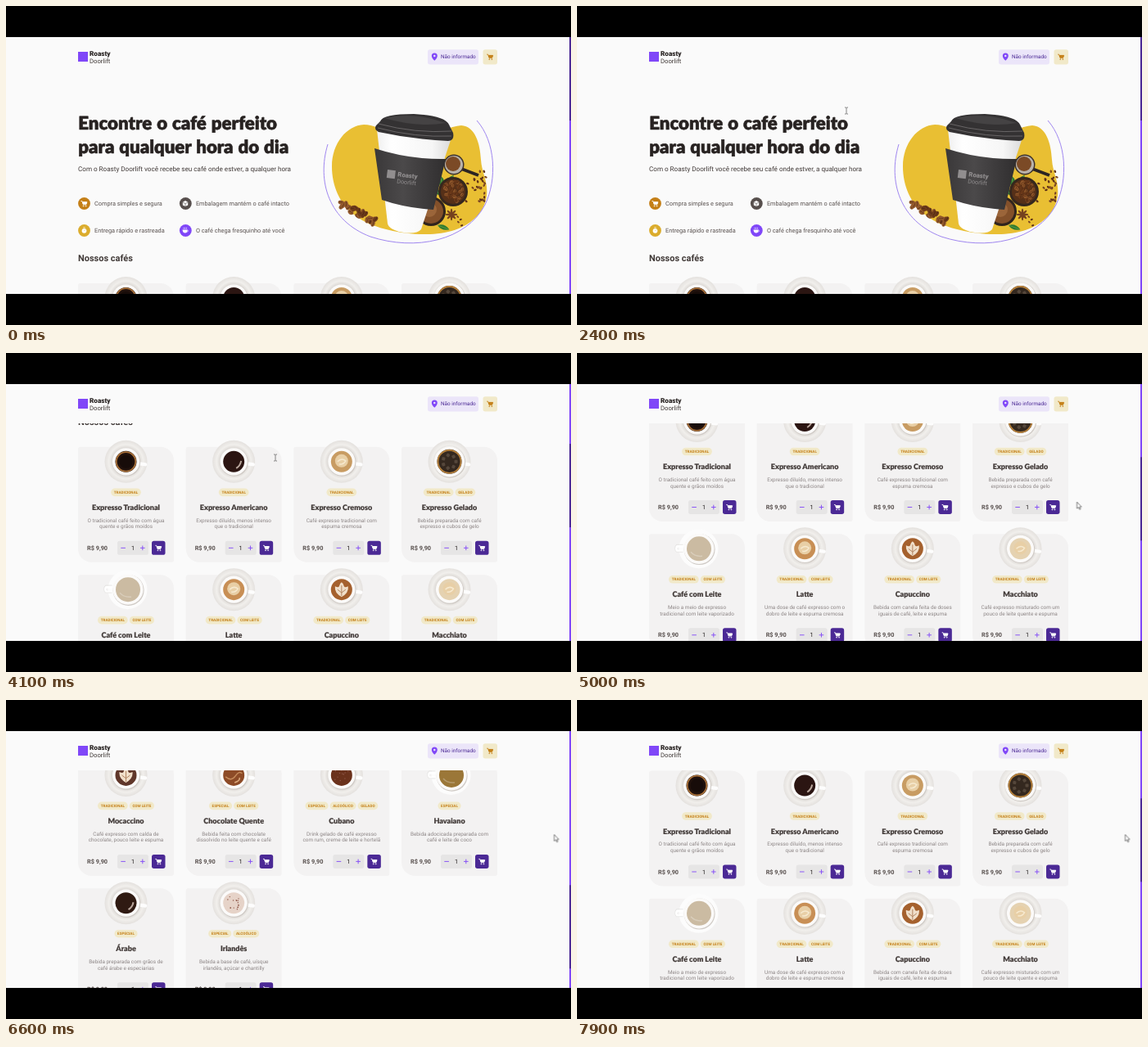
These frames come from a looping animation (690 by 390 pixels, 8 s). An HTML page:

```html
<!DOCTYPE html>
<html lang="pt-BR">
<head>
<meta charset="utf-8">
<title>Roasty Doorlift</title>
<style>
@property --scroll { syntax: "<number>"; inherits: true; initial-value: 0; }
html, body { margin: 0; width: 100%; height: 100%; overflow: hidden; background: #000; }
svg { display: block; width: 690px; height: 390px; font-family: Roboto, sans-serif; text-rendering: geometricPrecision; animation: scroll 8s linear infinite; }
.display { font-family: Lato, sans-serif; font-weight: 900; stroke-linejoin: round; }
.title { fill: #272221; stroke: #272221; stroke-width: .6px; word-spacing: .8px; }
.name { fill: #403937; stroke: #403937; stroke-width: .15px; }
#page { transform: translateY(calc(var(--scroll) * -1px)); }
#thumb { transform: translateY(calc(var(--scroll) * .326px)); }
#cursor { animation: move 8s linear infinite; }
#arrow { animation: arrow 8s step-end infinite; }
#beam { animation: beam 8s step-end infinite; }
@keyframes scroll {
  0%, 32.5% { --scroll: 0; }
  40% { --scroll: 72; }
  51.25% { --scroll: 224; }
  55%, 65% { --scroll: 274; }
  71.25% { --scroll: 364; }
  76.25%, 78.75% { --scroll: 647; }
  82.5% { --scroll: 578; }
  87.5%, 88.75% { --scroll: 450; }
  98.75%, 100% { --scroll: 252.5; }
}
@keyframes move {
  0%, 12.5% { transform: translate(420px, 352px); }
  22.5% { transform: translate(329px, 184px); }
  25%, 26.25% { transform: translate(329px, 134px); }
  30%, 55% { transform: translate(329px, 128px); }
  58.75%, 60% { transform: translate(551px, 200px); }
  65%, 100% { transform: translate(669.5px, 164.5px); }
}
@keyframes arrow {
  0% { opacity: 0; }
  12.5% { opacity: 1; }
  22.5% { opacity: 0; }
  56.25%, 100% { opacity: 1; }
}
@keyframes beam {
  0% { opacity: 0; }
  22.5% { opacity: 1; }
  56.25%, 100% { opacity: 0; }
}
</style>
</head>
<body>
<svg viewBox="0 0 690 390">
  <defs>
    <clipPath id="view"><rect y="86" width="690" height="266"/></clipPath>
    <radialGradient id="saucer">
      <stop offset=".6" stop-color="#d8d4d0"/><stop offset=".8" stop-color="#f1efec"/><stop offset="1" stop-color="#e4e1de"/>
    </radialGradient>
    <linearGradient id="paper">
      <stop offset="0" stop-color="#f0f0f0"/><stop offset=".2" stop-color="#fff"/><stop offset=".75" stop-color="#f6f6f6"/><stop offset="1" stop-color="#dcdcdc"/>
    </linearGradient>
    <linearGradient id="dark">
      <stop offset="0" stop-color="#3a3839"/><stop offset=".4" stop-color="#4b494a"/><stop offset="1" stop-color="#302e2f"/>
    </linearGradient>
    <g id="cart" fill="none" stroke="currentColor" stroke-width=".9">
      <path d="M-3.8-3h1.4l1.4 4.2h3.6l1-3h-5.4"/>
      <path d="M-1.7-1.5h4.9l-.7 2h-3.6z" fill="currentColor"/>
      <circle cx="-.7" cy="2.9" r=".5"/><circle cx="2.3" cy="2.9" r=".5"/>
    </g>
  </defs>
  <rect y="38" width="690" height="314" fill="#fafafa"/>
  <g clip-path="url(#view)"><g id="page"></g></g>
  <g id="header"></g>
  <rect x="688" y="38" width="2" height="314" fill="#8047f8"/>
  <rect id="thumb" x="688" y="38" width="2" height="102" fill="#4b2995"/>
  <g id="cursor">
    <path id="arrow" d="M0 0v8l1.9-1.6 1.3 2.8 1.2-.5-1.2-2.7h2.4z" fill="#fff" stroke="#444" stroke-width=".7"/>
    <path id="beam" d="M-2-4h1.5l.5.5.5-.5h1.5M0-3.5v7M-2 4h1.5l.5-.5.5.5h1.5" fill="none" stroke="#666" stroke-width=".8"/>
  </g>
  <rect y="352" width="690" height="38"/>
</svg>
<script>
const $ = id => document.getElementById(id);
const pen = document.createElement("canvas").getContext("2d");

let seed = 7;
const random = () => (seed = seed * 16807 % 2147483647) / 2147483647;

const text = (x, y, size, str, attrs = "") =>
  `<text x="${x}" y="${y + size * .35}" font-size="${size}" ${attrs}>${str}</text>`;
const rect = (x, y, w, h, fill, r = 0) =>
  `<rect x="${x}" y="${y}" width="${w}" height="${h}" rx="${r}" fill="${fill}"/>`;
const circle = (x, y, r, fill) => `<circle cx="${x}" cy="${y}" r="${r}" fill="${fill}"/>`;
const path = (d, fill, attrs = "") => `<path d="${d}" fill="${fill}" ${attrs}/>`;
const line = (d, color, width = .9) => path(d, "none", `stroke="${color}" stroke-width="${width}"`);
const at = (x, y, body, more = "") => `<g transform="translate(${x} ${y}) ${more}">${body}</g>`;
const cart = (x, y, color) => at(x, y, `<use href="#cart" color="${color}"/>`);
const times = (n, fn) => Array.from({ length: n }, (_, i) => fn(i)).join("");

const bean = (x, y, size) => at(x, y,
  `<ellipse rx="${size}" ry="${size * .68}" fill="${random() < .5 ? "#6d3b1b" : "#93592c"}"/>` +
  line(`M${-size * .8} 0q${size * .8}-1 ${size * 1.6} 0`, "#3a1c0d", .5),
  `rotate(${random() * 180})`);

// Beans scattered evenly over a disc
const pile = (n, x, y, r, size) => times(n, () => {
  const a = random() * 6.283, d = r * Math.sqrt(random());
  return bean(x + d * Math.cos(a), y + d * Math.sin(a), size);
});

function hero() {
  const blob = path("M398 196C398 168 416 146 437 145C464 145 472 172 497 165C520 160 540 147 556 146C573 147 579 168 580 188C581 204 589 214 587 232C583 262 552 278 518 279C488 280 452 273 432 260C409 246 398 222 398 196Z", "#e9bf33");
  const arc = line("M393 169C379 215 395 263 445 282C500 300 562 287 585 243C600 212 598 166 575 140", "#9f86f0", 1);
  const leaf = (x, y, size, turn) => at(x, y,
    path("M0 0Q-6-8 0-17Q6-8 0 0Z", "#2e7a30") + line("M0 0V-15", "#79ab4b", .6), `rotate(${turn}) scale(${size})`);
  const leaves = leaf(535, 226, 1.2, -15) + leaf(533, 231, 1, -60) + leaf(538, 219, .9, 35) + leaf(527, 268, .9, 110);
  const scoop = line("M556 199L577 207", "#2c2523", 4) + circle(547, 194, 12.5, "#3a302c") +
    circle(547, 194, 11, "#b9b2aa") + circle(546, 193, 9, "#7b4a26");
  const loose = times(26, i => bean(562 + random() * 24, 200 + random() * 42, 1.8)) + pile(5, 552, 264, 9, 1.6);
  const bowl = circle(546, 227, 18, "#35271e") + circle(546, 227, 15, "#563018") + pile(42, 546, 227, 13, 2.5);
  const ground = circle(519, 251, 18, "#30241d") + circle(519, 251, 15, "#83502a") + circle(517, 249, 9, "#9b653a");
  const anise = at(544, 255, times(8, i => `<ellipse cy="-3.6" rx="1.2" ry="3.6" fill="#76421f" transform="rotate(${i * 45})"/>`));
  const cup =
    path("M453 151L543 164L507 273Q502 279 486 277Q468 274 466 266Z", "url(#paper)") +
    path("M450 174Q493 188 537 187L522 249Q488 247 459 237Z", "url(#dark)") +
    path("M457 141Q460 132 498 132Q536 134 541 145L546 155Q548 165 540 165Q496 163 455 154Q449 151 452 146Z", "#343233") +
    line("M455 144Q500 156 544 153M454 149Q500 161 544 159", "#686566", 1) +
    path("M462 137Q500 129 537 143Q503 149 462 137Z", "#454344");
  const mark = at(466, 200, rect(0, 0, 10, 10, "#918e8f") +
    text(13, 4, 7.8, "Roasty", 'font-weight="800" fill="#918e8f"') +
    text(13, 12.5, 7.2, "Doorlift", 'fill="#918e8f"'), "rotate(7)");
  const left = times(30, i => bean(406 + (i % 15) * 3 + random() * 4, 238 + (i % 15) * 1.5 + random() * 9, 3.7));
  return blob + arc + scoop + loose + leaves + bowl + ground + anise + cup + mark + left;
}

function intro() {
  const feature = (x, y, color, icon, label) =>
    circle(x, y, 7.4, color) + icon + text(x + 12.6, y, 7.32, label, 'fill="#574f4d"');
  const box = path("M219 238l3.2 1.7v3.7l-3.2 1.7-3.2-1.7v-3.7z", "#fff") + line("M216 240l3 1.6 3-1.6M219 241.6v3.4", "#574f4d", .6);
  const timer = circle(95.5, 274.8, 2.9, "#fff") + rect(94.3, 270.5, 2.4, .8, "#fff") + line("M95.5 274.8l1.3-1.3", "#dbac2c", .6);
  const mug = path("M215.5 273.5h6.3q-.2 4-3.1 4t-3.2-4z", "#fff") + line("M221.8 274.3q2 .4-.6 2M217 272.5v-1.7M218.7 272.5v-1.7M220.4 272.5v-1.7", "#fff", .7);
  const title = 'class="display title"';
  return text(88.3, 143.3, 22.2, "Encontre o café perfeito", title) +
    text(88.3, 171.8, 22.2, "para qualquer hora do dia", title) +
    text(88, 198.7, 8.1, "Com o Roasty Doorlift você recebe seu café onde estver, a qualquer hora", 'fill="#403937"') +
    feature(95.5, 241.5, "#c47f17", cart(95.3, 241.5, "#fff"), "Compra simples e segura") +
    feature(219.3, 241.5, "#574f4d", box, "Embalagem mantém o café intacto") +
    feature(95.5, 274.5, "#dbac2c", timer, "Entrega rápido e rastreada") +
    feature(219.3, 274.5, "#8047f8", mug, "O café chega fresquinho até você") +
    text(88, 308, 10.97, "Nossos cafés", 'font-weight="700" fill="#403937"');
}

const T = "TRADICIONAL", L = "COM LEITE", E = "ESPECIAL", A = "ALCOÓLICO", G = "GELADO";
// name, tags, description, coffee colour, topping
const coffees = [
  ["Expresso Tradicional", [T], "O tradicional café feito com água|quente e grãos moídos", "#20110c", "rim"],
  ["Expresso Americano", [T], "Expresso diluído, menos intenso|que o tradicional", "#2b1512", "shine"],
  ["Expresso Cremoso", [T], "Café expresso tradicional com|espuma cremosa", "#c89c63", "foam"],
  ["Expresso Gelado", [T, G], "Bebida preparada com café|expresso e cubos de gelo", "#34281f", "ice"],
  ["Café com Leite", [T, L], "Meio a meio de expresso|tradicional com leite vaporizado", "#cbbba2", "plain"],
  ["Latte", [T, L], "Uma dose de café expresso com o|dobro de leite e espuma cremosa", "#c88f55", "foam"],
  ["Capuccino", [T, L], "Bebida com canela feita de doses|iguais de café, leite e espuma", "#a5612e", "leaf"],
  ["Macchiato", [T, L], "Café expresso misturado com um|pouco de leite quente e espuma", "#e5d2b1", "foam"],
  ["Mocaccino", [T, L], "Café expresso com calda de|chocolate, pouco leite e espuma", "#60372a", "leaf"],
  ["Chocolate Quente", [E, L], "Bebida feita com chocolate|dissolvido no leite quente e café", "#8d4b27", "swirl"],
  ["Cubano", [E, A, G], "Drink gelado de café expresso|com rum, creme de leite e hortelã", "#6b321c", "dots"],
  ["Havaiano", [E], "Bebida adocicada preparada com|café e leite de coco", "#9b7738", "plain"],
  ["Árabe", [E], "Bebida preparada com grãos de|café árabe e especiarias", "#2f1a12", "shine"],
  ["Irlandês", [E, A], "Bebida a base de café, uísque|irlandês, açúcar e chantilly", "#e6d3c8", "dots"]
];

const toppings = {
  rim: () => `<circle r="11.8" fill="none" stroke="#a9713a" stroke-width="1.8"/>` + circle(0, 0, 8, "#170c09"),
  shine: () => line("M3 8Q8 5 9-1", "#b9a69c", 2),
  foam: () => circle(0, -1, 8, "#e8cfa6") + line("M-5 0Q0-5 5-1Q2 4-3 3", "#f6e9cf", 1.5),
  ice: () => `<circle r="14" fill="none" stroke="#b8823c" stroke-width="1.8"/>` +
    times(7, i => at(8 * Math.cos(i * .9), 8 * Math.sin(i * .9), rect(-2, -2, 4, 4, "#55473b", 1), `rotate(${i * 25})`)),
  leaf: () => path("M0 9Q-9 4-8-4Q-4-2-3-4Q-2-8 0-9Q2-8 3-4Q4-2 8-4Q9 4 0 9Z", "#f0dfca") + line("M0 8V-5M-5 0L0 4L5 0", "#b28460", 1),
  swirl: () => line("M-10 2Q-3 8 2 1T10-2", "#c68c5c", 1.5) + line("M1 9Q8 7 7 3", "#dba87c", 1.5),
  dots: () => times(16, () => circle(random() * 16 - 8, random() * 16 - 8, .7, "#8d5546")),
  plain: () => line("M-10 4Q-5 10 4 9", "#fff4", 1.5)
};

function cupTop(x, y, color, kind) {
  const plain = kind === "plain", r = plain || kind === "ice" ? 15 : 13;
  const base = plain
    ? circle(2, 0, 24, "#fcfcfc") + line("M-17-3h-7q-4 3 0 6h7", "#fff", 3) + line("M-17-5h-8q-4 5 0 9h8", "#d9d7d5", .6)
    : circle(0, 0, 26, "url(#saucer)") + at(0, 0, rect(15, -2, 11, 4.2, "#fdfdfd", 2), "rotate(8)");
  return at(x, y, base + at(plain ? 2.5 : 0, 0,
    circle(.6, .8, r + 4, "#d0cbc6") + circle(0, 0, r + 3.6, "#fbfaf9") + circle(0, 0, r, color) + toppings[kind]()));
}

function tagRow(x, y, tags) {
  pen.font = "700 45.7px Roboto, sans-serif";
  const widths = tags.map(t => pen.measureText(t).width / 10 + 7.3), gap = 2;
  let left = x - (widths.reduce((a, b) => a + b) + gap * (tags.length - 1)) / 2;
  return tags.map((t, i) => {
    const w = widths[i];
    const tag = rect(left, y - 4.8, w, 9.6, "#f1e9c9", 4.8) +
      text(left + w / 2, y, 4.57, t, 'text-anchor="middle" font-weight="700" fill="#c47f17"');
    left += w + gap;
    return tag;
  }).join("");
}

function card([name, tags, about, color, kind], i) {
  const mid = 'text-anchor="middle"', lines = about.split("|");
  return at(88 + (i % 4) * 131.67, 339 + Math.floor(i / 4) * 156.3,
    path("M2.7 0H100.5A16.5 16.5 0 0 1 117 16.5V138.3A2.7 2.7 0 0 1 114.3 141H16.5A16.5 16.5 0 0 1 0 124.5V2.7A2.7 2.7 0 0 1 2.7 0Z", "#f3f2f2") +
    cupTop(58.5, 18, color, kind) + tagRow(58.5, 55.5, tags) +
    text(58.5, 74, 9, name, `class="display name" ${mid}`) +
    lines.map((s, n) => text(58.5, 89.7 + n * 7.6, 6.4, s, `fill="#8d8686" ${mid}`)).join("") +
    text(11, 123.6, 7.32, "R$ 9,90", 'font-weight="700" fill="#574f4d"') +
    rect(48, 115, 38, 17, "#e6e5e5", 2.7) +
    line("M52.3 123.5h5.6M76 123.5h5.6M78.8 120.7v5.6", "#8047f8") +
    text(67, 123.6, 7.32, "1", `fill="#272221" ${mid}`) +
    rect(90, 115, 16.5, 17, "#4b2995", 2.7) + cart(98.1, 123.5, "#fff"));
}

$("page").innerHTML = intro() + hero() + coffees.map(card).join("");
$("header").innerHTML =
  rect(88, 56, 12, 12, "#8047f8") +
  text(102, 58.2, 8.2, "Roasty", 'font-weight="800" fill="#272221"') +
  text(102, 67.4, 7.7, "Doorlift", 'fill="#403937"') +
  rect(515, 53.3, 62, 18.2, "#ebe5f9", 2.7) +
  path("M523.3 66.8Q519.8 63.5 519.8 61A3.5 3.5 0 0 1 526.8 61Q526.8 63.5 523.3 66.8Z", "#8047f8") +
  circle(523.3, 61, 1.2, "#ebe5f9") +
  text(531, 62.2, 6.4, "Não informado", 'fill="#4b2995"') +
  rect(582.5, 53.3, 17.5, 18.2, "#f1e9c9", 2.7) + cart(591, 62.2, "#c47f17");
</script>
</body>
</html>
```
